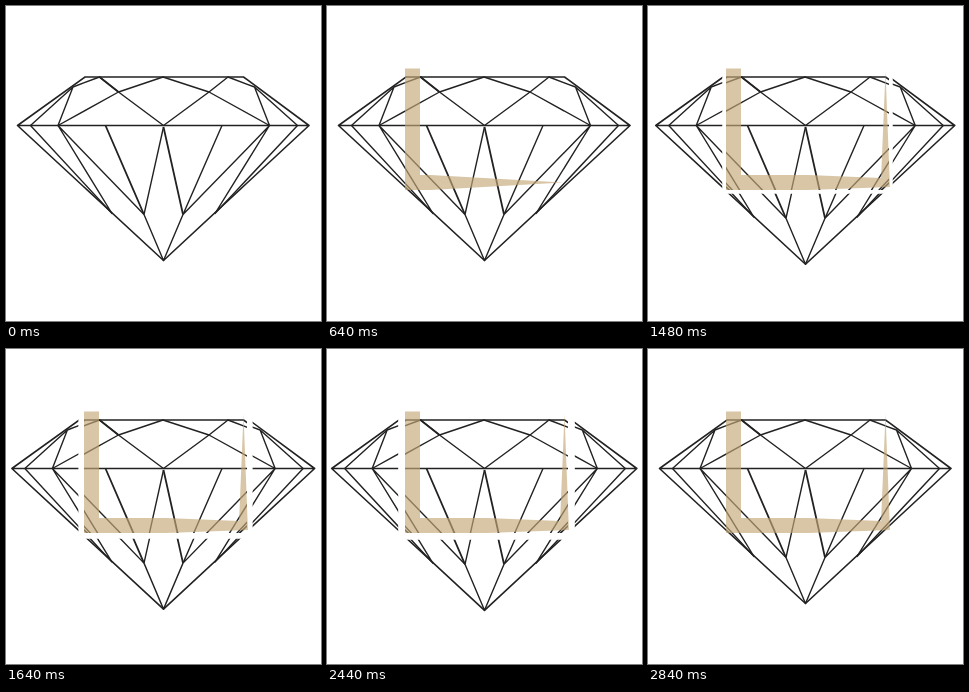
These frames come from a looping animation (315x315 px, 2880 ms). An HTML page:

```html
<!DOCTYPE html>
<html lang="en">
<head>
<meta charset="utf-8">
<title>Diamond</title>
<style>
html, body { margin: 0; width: 100%; height: 100%; overflow: hidden; background: #fff; }
svg { display: block; width: 100vw; height: 100vh; }
</style>
</head>
<body>
<svg viewBox="0 0 315 315">
  <defs>
    <clipPath id="cutMid"><rect x="78" y="0" width="163" height="184"/></clipPath>
    <clipPath id="cutLeft"><rect x="-20" y="0" width="98" height="315"/></clipPath>
    <clipPath id="cutRight"><rect x="241" y="0" width="94" height="315"/></clipPath>
    <clipPath id="cutLow"><rect x="78" y="184" width="163" height="151"/></clipPath>
    <g id="gem" fill="none" stroke="#222" stroke-width="1.4" stroke-linejoin="round">
      <path stroke-width="1.6" d="M79 71H237.500L303 119.500L157.500 254.500L11.500 119.500ZM11.500 119.500H303"/>
      <!-- crown -->
      <path d="M24.500 119.500L67 81L93.500 71L112.500 86L157 71L203 86L222 71L248.500 81L291.500 119.500
        M67 81L52 119.500L112.500 86L157.500 119.500L203 86L263.500 119.500L248.500 81"/>
      <!-- pavilion -->
      <path d="M24.500 119.500L106 207.500L52 119.500L138 208.500L157.500 254.500L177 208.500L263.500 119.500L209 207.500L291.500 119.500
        M138 208.500L157.500 121M177 208.500L216 119.500"/>
      <path stroke-width="1.8" d="M99.500 119.500L138 208.500M157.500 121L177 208.500M93.500 71L112.500 86"/>
    </g>
  </defs>
  <rect width="315" height="315" fill="#fff"/>
  <g clip-path="url(#cutMid)"><use href="#gem"/></g>
  <g id="left" clip-path="url(#cutLeft)"><use href="#gem"/></g>
  <g id="right" clip-path="url(#cutRight)"><use href="#gem"/></g>
  <g id="low" clip-path="url(#cutLow)"><use href="#gem"/></g>
  <path id="band" fill="#c4a878" fill-opacity=".65"/>
</svg>
<script>
const LOOP = 2880, STEP = 40, WIDTH = 15, SPREAD = 7.5;
const corners = [[85.5, 62.5], [85.5, 176.5], [237.5, 176.5], [237.5, 65]];
const segs = corners.slice(1).map((b, i) => {
  const a = corners[i], len = Math.hypot(b[0] - a[0], b[1] - a[1]);
  return { a, len, dx: (b[0] - a[0]) / len, dy: (b[1] - a[1]) / len };
});
const total = segs.reduce((sum, s) => sum + s.len, 0);
const $ = id => document.getElementById(id);
const clamp = v => Math.min(1, Math.max(0, v));

// Mitred band whose second half tapers to a point
function bandPath(drawn) {
  if (drawn <= 0) return "";
  const one = [], two = [];
  const add = (x, y, nx, ny, at) => {
    const h = WIDTH / 2 * clamp((drawn - at) / (drawn / 2));
    one.push([x + nx * h, y + ny * h]);
    two.unshift([x - nx * h, y - ny * h]);
  };
  let start = 0, prev = null;
  for (const s of segs) {
    if (start >= drawn) break;
    const nx = -s.dy, ny = s.dx;
    add(s.a[0], s.a[1], nx + (prev ? -prev.dy : 0), ny + (prev ? prev.dx : 0), start);
    for (const at of [drawn / 2, drawn]) {
      const d = at - start;
      if (d > 0 && d <= s.len) add(s.a[0] + s.dx * d, s.a[1] + s.dy * d, nx, ny, at);
    }
    start += s.len;
    prev = s;
  }
  return "M" + one.concat(two).map(p => p[0].toFixed(2) + " " + p[1].toFixed(2)).join("L") + "Z";
}

function grow(t) {
  const u = clamp(t / 1120);
  return total * u * (0.9 + u * (1.2 - 1.1 * u));
}

function render(ms) {
  const t = Math.floor((ms % LOOP) / STEP) * STEP;
  const d = SPREAD * Math.min(clamp((t - 1160) / 640), clamp((2840 - t) / 440));
  $("band").setAttribute("d", bandPath(grow(t)));
  $("left").setAttribute("transform", `translate(${-d} 0)`);
  $("right").setAttribute("transform", `translate(${d} 0)`);
  $("low").setAttribute("transform", `translate(0 ${d})`);
}

const begin = performance.now();
function tick() {
  render(performance.now() - begin);
  requestAnimationFrame(tick);
}
tick();
</script>
</body>
</html>
```
